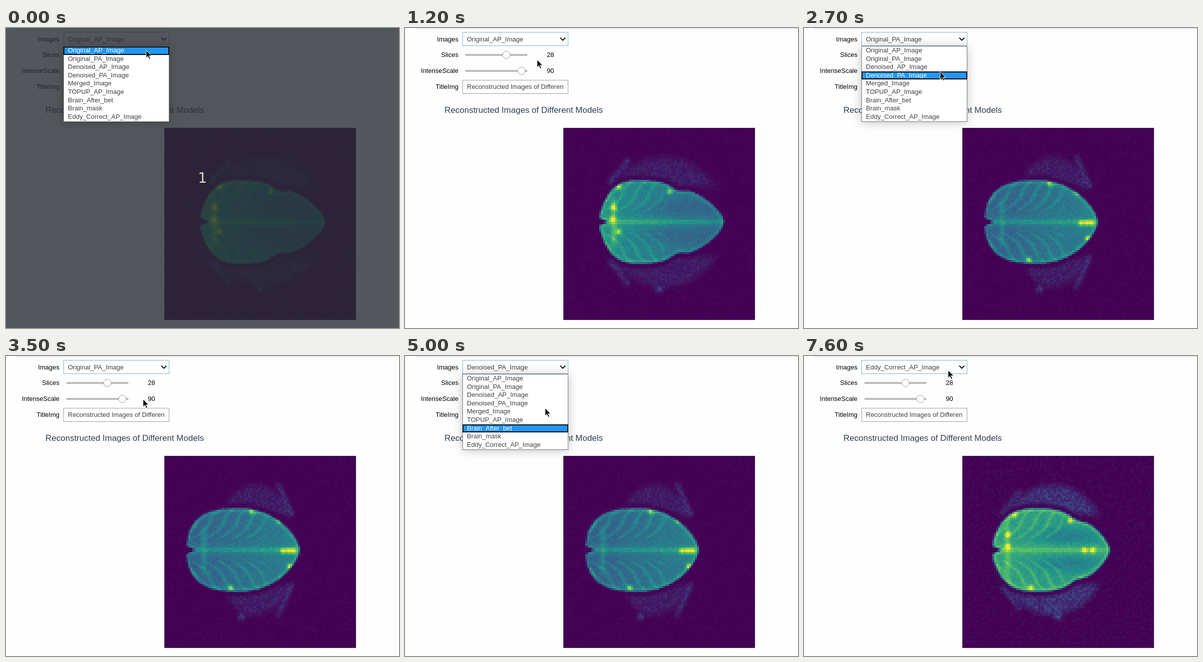
An HTML page with a canvas that plays this animation: 787x601 px, repeating every 8000 ms.

```html
<!DOCTYPE html>
<html lang="en">
<head>
<meta charset="utf-8">
<title>Scan viewer</title>
<style>
@property --i { syntax: "<integer>"; inherits: true; initial-value: 0; }
html, body { margin: 0; width: 100%; height: 100%; overflow: hidden; background: #fefefe; }
body { position: relative; font: 13px/15px "Liberation Sans", Arial, sans-serif; color: #000; }
body *, body *::after { box-sizing: border-box; }
.a { position: absolute; white-space: pre; }
.label { right: calc(100% - 107px); }
.box { left: 115px; width: 212px; height: 28px; border: 1px solid #9e9e9e; background: #fff; }
.window { left: 124px; height: 15px; overflow: hidden; color: #404040; }
.track { left: 121px; width: 124px; height: 4px; background: #bdbdbd; }
.knob { width: 16px; height: 16px; border: 1px solid #9e9e9e; border-radius: 50%; background: #fff; }
.num { left: 284px; }
#plot, #scans, #values, #popup, #arrow, #shade { animation: 8s step-end infinite; }
#plot { inset: 0; animation-name: plot; }
#title { left: 79px; top: 155px; font-size: 17px; line-height: 19px; color: #2a3f55; }
#frame { left: 317px; top: 200px; width: 384px; height: 385px; overflow: hidden; background: #440154; }
#frame::after { content: ""; position: absolute; inset: 0; border: 1px solid #3a2a48; }
#scans { animation-name: scans; }
canvas { display: block; width: 384px; height: 385px; image-rendering: pixelated; }
#values { animation-name: values; }
#shade { inset: 0; background: rgba(39, 44, 50, .795); animation-name: shade; }
#count { inset: 0; text-align: center; font: 28px/601px "DejaVu Sans", sans-serif; color: #dcdcd6; }
#popup {
  left: 115px; top: 36px; width: 212px; height: 152px;
  border: 1px solid #777; background: #fff; color: #404040;
  box-shadow: 0 1px 18px rgba(0, 0, 0, .25);
  animation-name: popup;
}
.list { left: 8px; top: 0; line-height: 16.6px; }
#pick {
  left: -1px; right: -1px; top: calc(var(--i) * 16.6px); height: 16.6px;
  overflow: hidden; background: #2196f3; color: #fff;
}
#pick .list { left: 9px; top: calc(var(--i) * -16.6px); }
#pick::after { content: ""; position: absolute; inset: 0; border: 2px solid #0a0a0a; }
#arrow { left: 0; top: 0; animation-name: arrow; }

@keyframes shade { 0% { visibility: visible } 1.25%, 100% { visibility: hidden } }
@keyframes plot {
  0%, 18.75%, 46.25%, 100% { visibility: visible }
  16.25%, 45% { visibility: hidden }
}
@keyframes scans {
  0% { transform: none }
  16.25% { transform: translateY(-385px) }
  78.75%, 100% { transform: translateY(-770px) }
}
@keyframes values {
  0% { transform: none }
  16.25% { transform: translateY(-15px) }
  45% { transform: translateY(-30px) }
  78.75%, 100% { transform: translateY(-45px) }
}
@keyframes popup {
  0% { --i: 0; visibility: visible }
  1.25% { --i: 1; visibility: visible }
  15% { --i: 1; visibility: hidden }
  25% { --i: 1; visibility: visible }
  30% { --i: 1; visibility: visible; animation-timing-function: steps(2) }
  32.5% { --i: 3; visibility: visible }
  43.75% { --i: 3; visibility: hidden }
  57.5% { --i: 3; visibility: visible }
  58.75% { --i: 3; visibility: visible; animation-timing-function: steps(3) }
  62.5% { --i: 6; visibility: visible }
  63.75% { --i: 8; visibility: visible }
  77.5%, 100% { --i: 8; visibility: hidden }
}
@keyframes arrow {
  0% { transform: translate(280px, 44px) }
  1.25% { transform: translate(270px, 58px) }
  2.5% { transform: translate(270px, 58px); animation-timing-function: steps(2) }
  5% { transform: translate(264px, 63px) }
  20% { transform: translate(264px, 63px); animation-timing-function: steps(3) }
  23.75% { transform: translate(282px, 23px) }
  28.75% { transform: translate(282px, 23px); animation-timing-function: steps(4) }
  33.75% { transform: translate(272px, 87px) }
  43.75% { transform: translate(274px, 86px) }
  50% { transform: translate(286px, 72px) }
  52.5% { transform: translate(304px, 38px) }
  53.75% { transform: translate(282px, 20px) }
  58.75% { transform: translate(282px, 20px); animation-timing-function: steps(3) }
  62.5% { transform: translate(280px, 104px) }
  63.75% { transform: translate(265px, 157px) }
  66.25% { transform: translate(263px, 178px) }
  70% { transform: translate(266px, 178px) }
  85% { transform: translate(266px, 178px); animation-timing-function: steps(2) }
  87.5% { transform: translate(273px, 157px) }
  90% { transform: translate(265px, 108px) }
  91.25% { transform: translate(265px, 108px); animation-timing-function: steps(3) }
  95%, 100% { transform: translate(288px, 28px) }
}
</style>
</head>
<body>
<div class="a" style="left:21px;right:0;top:0;height:1px;background:#cdcdcd"></div>

<div class="a label" style="top:15px">Images</div>
<div class="a label" style="top:46px">Slices</div>
<div class="a label" style="top:78px">IntenseScale</div>
<div class="a label" style="top:110px">TitleImg</div>

<div class="a box" style="top:8px;border-color:#7db3d3"></div>
<div class="a window" style="top:15px;width:180px"><div id="values">Original_AP_Image
Original_PA_Image
Denoised_PA_Image
Eddy_Correct_AP_Image</div></div>
<svg class="a" style="left:309px;top:17px" width="14" height="10" fill="none" stroke="#111" stroke-width="2"><path d="M2 2.5l5 5 5-5"/></svg>

<div class="a track" style="top:52px"></div>
<div class="a knob" style="left:195px;top:46px"></div>
<div class="a num" style="top:46px">28</div>
<div class="a track" style="top:84px"></div>
<div class="a knob" style="left:225px;top:78px"></div>
<div class="a num" style="top:78px">90</div>

<div class="a box" style="top:104px"></div>
<div class="a window" style="top:110px;width:194px">Reconstructed Images of Different Models</div>

<div class="a" id="plot">
  <div class="a" id="title">Reconstructed Images of Different Models</div>
  <div class="a" id="frame"><div id="scans"></div></div>
</div>

<div class="a" id="shade"><div class="a" id="count">1</div></div>

<div class="a" id="popup">
  <div class="a list">Original_AP_Image
Original_PA_Image
Denoised_AP_Image
Denoised_PA_Image
Merged_Image
TOPUP_AP_Image
Brain_After_bet
Brain_mask
Eddy_Correct_AP_Image</div>
  <div class="a" id="pick"></div>
</div>

<svg class="a" id="arrow" width="16" height="22"><path d="M.5.5V16l3.6-3.4 2.7 5.9 2.5-1.1-2.6-5.7h4.9z" fill="#151515" stroke="#fff" stroke-width=".9"/></svg>

<script>
document.getElementById('pick').append(document.querySelector('.list').cloneNode(true));

const size = 96, cell = 4, midX = 470, midY = 388, tall = 83;

// left/right: ends of the body; round: bluntness of its left end; hot: bright points
const scans = [
  {
    left: 388, right: 639, round: .7, dent: 9, base: .5, tilt: -.2, rim: .13, fold: .1, pool: .06,
    column: 418, glow: .2, hazeX: 518, hazeR: 132, haze: .08, streak: [411, 80, 446, 122], spot: 510,
    hot: [[418, 360], [416, 383], [428, 318], [530, 328], [428, 407]], noise: .02
  },
  {
    left: 362, right: 588, round: .42, dent: 0, base: .29, tilt: .14, rim: .15, fold: .11, pool: 0,
    column: 396, glow: .13, hazeX: 500, hazeR: 88, haze: .08, streak: [572, 72, 546, 128], spot: 472,
    hot: [[555, 390], [566, 390], [576, 390], [553, 446], [548, 330], [450, 463], [492, 312], [568, 420]], noise: .02
  },
  {
    left: 377, right: 612, round: .6, dent: 7, base: .56, tilt: -.04, rim: .16, fold: .11, pool: .12,
    column: 408, glow: .15, hazeX: 498, hazeR: 118, haze: .14, streak: [398, 75, 430, 115], spot: 509,
    hot: [[408, 358], [408, 382], [422, 318], [533, 330], [455, 463], [557, 447], [562, 389], [578, 389]], noise: .035
  }
];

const clamp = v => Math.max(0, Math.min(1, v));
const gauss = (d, w) => Math.exp(-d * d / (w * w));

function random(seed) {
  return () => (seed = (seed * 16807) % 2147483647) / 2147483647;
}

const stops = [[68, 1, 84], [59, 82, 139], [33, 145, 140], [94, 201, 98], [253, 231, 37]];
function colour(v) {
  const p = Math.min(.9999, clamp(v)) * 4, i = Math.floor(p);
  return stops[i].map((a, k) => a + (stops[i + 1][k] - a) * (p - i));
}

// Half height of the body at x, negative beyond its ends
function reach(s, x) {
  const left = x < midX;
  const t = left ? (midX - x) / (midX - s.left) : (x - midX) / (s.right - midX);
  if (t > 1) return (1 - t) * 160;
  return tall * (1 - t ** (left ? 3 : 2)) ** (left ? s.round : .65) - s.dent * gauss(x - 546, 18);
}

function toSegment(x, y, [x1, y1, x2, y2]) {
  const dx = x2 - x1, dy = y2 - y1;
  const t = clamp(((x - x1) * dx + (y - y1) * dy) / (dx * dx + dy * dy));
  return Math.hypot(x - x1 - t * dx, y - y1 - t * dy);
}

function inside(s, x, y, a, depth) {
  const u = (x - s.left) / (s.right - s.left);
  const wave = x - .9 * a + 5 * Math.sin(a / 9);
  const ridge = Math.cos(Math.PI * (wave - 412) / 27) ** 8;
  let v = s.base + s.tilt * u;
  v += .05 * gauss(a, 16) - s.pool * gauss(a - 26, 15) * gauss(x - 525, 55);
  v += s.fold * ridge * clamp((a - 18) / 8) * clamp((530 - x) / 20);
  v += .13 * gauss(y - midY, 4) * clamp((x - s.left - 20) / 20);
  v += s.rim * gauss(depth - 2, 5);
  v += s.glow * gauss(x - s.column, 6) * clamp((55 - a) / 20);
  for (const [hx, hy] of s.hot) v += .45 * gauss(Math.hypot(x - hx, y - hy), 5.5);
  return v;
}

function outside(s, x, y, a, depth) {
  const e = Math.hypot((x - s.hazeX) / s.hazeR, (y - midY) / 138);
  return s.haze * clamp((1 - e) * 8) * clamp((-depth - 5) / 8) * clamp((a - 58) / 20)
    + .11 * gauss(toSegment(x, a, s.streak), 6)
    + .18 * gauss(Math.hypot(x - s.spot, y - 522), 7);
}

function intensity(s, x, y) {
  const a = Math.abs(y - midY);
  const slope = (reach(s, x + 2) - reach(s, x - 2)) / 4;
  const notch = a * 1.2 + (x - s.left - 18) / 2;
  const depth = Math.min((reach(s, x) - a) / Math.hypot(1, slope), notch);
  const mask = clamp(depth / 5 + .4);
  const out = outside(s, x, y, a, depth);
  return mask ? out + (inside(s, x, y, a, depth) - out) * mask : out;
}

function draw(s, n) {
  const canvas = document.createElement('canvas'), rand = random(71 + n);
  canvas.width = canvas.height = size;
  const c = canvas.getContext('2d'), img = c.createImageData(size, size);
  for (let i = 0; i < size * size; i++) {
    const x = 317 + (i % size + .5) * cell, y = 200 + (Math.floor(i / size) + .5) * cell;
    const r = rand();
    let v = intensity(s, x, y);
    v = v < .22 ? v * (.65 + .7 * r) + s.noise * r ** 4 : v + (r - .5) * .06;
    img.data.set([...colour(v), 255], i * 4);
  }
  c.putImageData(img, 0, 0);
  document.getElementById('scans').append(canvas);
}

scans.forEach(draw);
</script>
</body>
</html>
```
